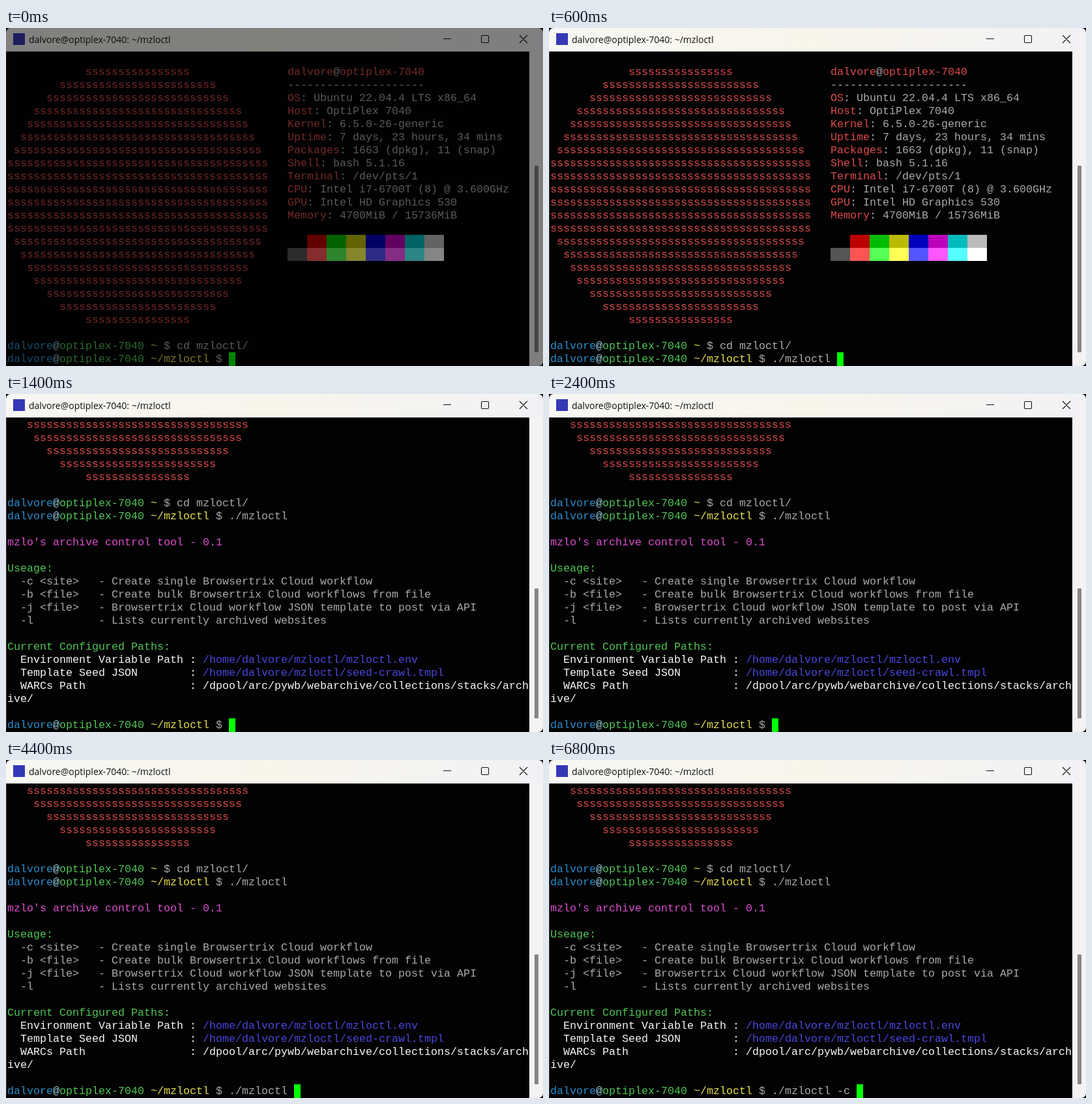
An HTML page with a canvas for the animation above (8000 ms loop, 824x518 px).

```html
<!DOCTYPE html>
<html lang="en">
<head>
<meta charset="utf-8">
<title>Terminal</title>
<style>
html, body { margin: 0; width: 100%; height: 100%; overflow: hidden; background: #000; }
canvas { display: block; width: 824px; height: 518px; }
</style>
</head>
<body>
<canvas id="stage" width="824" height="518"></canvas>
<script>
const ctx = document.getElementById('stage').getContext('2d');
const W = 824, H = 518, LOOP = 8000;
const CELL_W = 10, CELL_H = 20, LEFT = 2, TOP = 37, ROWS = 24;

const COLORS = {
  r: '#dc4b4b', w: '#f8f8f8', d: '#aeaaa6', g: '#50c654',
  y: '#e8e04a', b: '#4b47dc', u: '#2b8ccb', c: '#9fd8e6', m: '#dc4ece'
};
const USER = 'dalvore', HOST = 'optiplex-7040', TOOL = 'mzloctl';
const prompt = path => `{u}${USER}{c}@{g}${HOST} {y}${path} {d}$ `;
const COMMAND = `./${TOOL} `;

const INFO = [
  `{r}${USER}{d}@{r}${HOST}`,
  '{d}' + '-'.repeat(21),
  ...[
    'OS: Ubuntu 22.04.4 LTS x86_64',
    'Host: OptiPlex 7040',
    'Kernel: 6.5.0-26-generic',
    'Uptime: 7 days, 23 hours, 34 mins',
    'Packages: 1663 (dpkg), 11 (snap)',
    'Shell: bash 5.1.16',
    'Terminal: /dev/pts/1',
    'CPU: Intel i7-6700T (8) @ 3.600GHz',
    'GPU: Intel HD Graphics 530',
    'Memory: 4700MiB / 15736MiB'
  ].map(s => '{r}' + s.replace(':', '{d}:'))
];

// One row of a plain disc, 40 columns wide and 20 rows high
function discRow(i) {
  const half = Math.round(20 * Math.sqrt(1 - (i - 9.5) ** 2 / 107.4) + 0.4);
  return ' '.repeat(20 - half) + 's'.repeat(2 * half) + ' '.repeat(20 - half);
}

const LINES = [
  '',
  ...Array.from({ length: 20 }, (_, i) => `{r}${discRow(i)}   ${INFO[i] || ''}`),
  '',
  prompt('~') + `cd ${TOOL}/`,
  prompt('~/' + TOOL) + COMMAND,
  '',
  "{m}mzlo's archive control tool - 0.1",
  '',
  '{g}Useage:',
  '{d}  -c <site>   - Create single Browsertrix Cloud workflow',
  '{d}  -b <file>   - Create bulk Browsertrix Cloud workflows from file',
  '{d}  -j <file>   - Browsertrix Cloud workflow JSON template to post via API',
  '{d}  -l          - Lists currently archived websites',
  '',
  '{g}Current Configured Paths:',
  `{w}  Environment Variable Path : {b}/home/${USER}/${TOOL}/${TOOL}.env`,
  `{w}  Template Seed JSON        : {b}/home/${USER}/${TOOL}/seed-crawl.tmpl`,
  '{w}  WARCs Path                : /dpool/arc/pywb/webarchive/collections/stacks/arch',
  '{w}ive/',
  ''
];

// [start ms, first visible line, typed text]
const STEPS = [
  [0, 0, ''],
  [400, 0, COMMAND.slice(0, 3)],
  [600, 0, COMMAND],
  [1400, 16, ''],
  [3000, 16, COMMAND.slice(0, 2)],
  [4000, 16, COMMAND.slice(0, 3)],
  [4200, 16, COMMAND],
  [5400, 16, COMMAND + '-'],
  [6000, 16, COMMAND + '-c'],
  [6600, 16, COMMAND + '-c ']
];

function rect(color, x, y, w, h) {
  ctx.fillStyle = color;
  ctx.fillRect(x, y, w, h);
}

// Draws a line with {colour} marks and returns the column after it
function drawLine(line, row) {
  const y = TOP + row * CELL_H + 15;
  let col = 0;
  line.split(/\{(\w)\}/).forEach((part, i) => {
    if (i % 2) {
      ctx.fillStyle = COLORS[part];
      return;
    }
    for (const ch of part) {
      if (ch !== ' ') ctx.fillText(ch, LEFT + col * CELL_W, y);
      col++;
    }
  });
  return col;
}

function drawPalette(row) {
  const x = LEFT + 43 * CELL_W, y = TOP + row * CELL_H;
  for (let i = 0; i < 8; i++) {
    const mix = (lo, hi) => `rgb(${[1, 2, 4].map(bit => i & bit ? hi : lo)})`;
    if (i) rect(mix(0, 187), x + i * 30, y, 30, CELL_H);
    rect(mix(85, 255), x + i * 30, y + CELL_H, 30, CELL_H);
  }
}

function drawTitleBar() {
  const bg = ctx.createLinearGradient(0, 0, W, 0);
  bg.addColorStop(0, '#f7f7f3');
  bg.addColorStop(0.5, '#f8f5eb');
  bg.addColorStop(1, '#f2f2f6');
  rect(bg, 0, 0, W, 36);
  rect('#3438b4', 11, 8, 18, 18);

  ctx.font = '14px "Open Sans", "Noto Sans", sans-serif';
  ctx.fillStyle = '#111';
  ctx.fillText(`${USER}@${HOST}: ~/${TOOL}`, 35, 23);

  ctx.strokeStyle = '#111';
  ctx.lineWidth = 1.1;
  ctx.beginPath();
  ctx.moveTo(671, 16.5);
  ctx.lineTo(683, 16.5);
  ctx.roundRect(729.5, 11.5, 11, 11, 1.5);
  ctx.moveTo(788, 11);
  ctx.lineTo(800, 23);
  ctx.moveTo(800, 11);
  ctx.lineTo(788, 23);
  ctx.stroke();
}

function drawScrollbar(first) {
  rect('#f3f3f3', 803, 36, 21, H - 36);
  const y = first ? 298 : 211;
  ctx.fillStyle = '#858585';
  ctx.beginPath();
  ctx.roundRect(811, y, 6, 497 - y, 1);
  ctx.fill();
}

function drawTerminal(first, typed) {
  ctx.font = '16.664px "Liberation Mono", "Courier New", monospace';
  LINES.slice(first, first + ROWS - 1).forEach(drawLine);
  if (!first) drawPalette(14);
  const col = drawLine(prompt('~/' + TOOL) + typed, ROWS - 1);
  const y = TOP + (ROWS - 1) * CELL_H;
  rect('#00ff00', LEFT + col * CELL_W, y, CELL_W, H - y);
}

function draw(t) {
  const [, first, typed] = STEPS.findLast(step => step[0] <= t);
  rect('#000', 0, 0, W, H);
  ctx.save();
  ctx.beginPath();
  ctx.roundRect(0, 0, W, H, 7);
  ctx.clip();
  rect('#020203', 0, 36, W, H - 36);
  drawTitleBar();
  drawScrollbar(first);
  rect('#3c3c3c', 0, 36, 1, H - 36);
  drawTerminal(first, typed);
  ctx.restore();
  if (t < 200) rect('rgba(0, 0, 0, 0.48)', 0, 0, W, H);
}

const start = performance.now();
function tick() {
  draw((performance.now() - start) % LOOP);
  requestAnimationFrame(tick);
}
tick();
</script>
</body>
</html>
```
